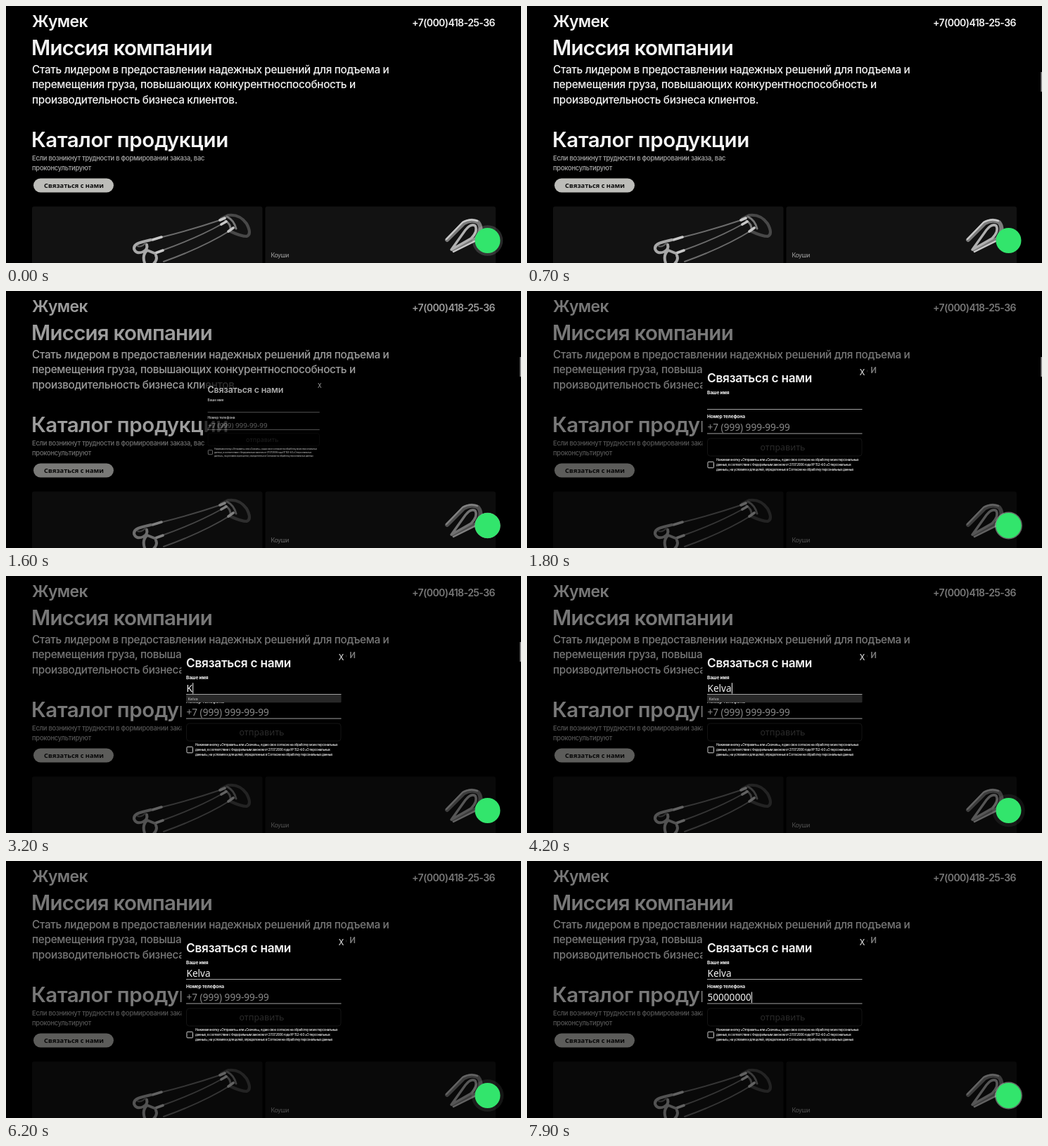
Animation, 732 px wide and 366 px high, one loop 8000 ms. Source, as an HTML page:

```html
<!DOCTYPE html>
<html lang="ru">
<head>
<meta charset="utf-8">
<title>Каталог</title>
<style>
  html, body { margin: 0; width: 100%; height: 100%; overflow: hidden; background: #000; }
  svg { display: block; width: 732px; height: 366px; }
  text { white-space: pre; font-family: Inter, sans-serif; fill: #f4f4f4; }
  .h { font-size: 29.5px; font-weight: 600; }
  .body { font-size: 15.3px; font-weight: 500; letter-spacing: -.31px; }
  .note { font-size: 9.4px; font-weight: 500; letter-spacing: -.25px; fill: #acacac; }
  .label { font-size: 6.6px; font-weight: 700; letter-spacing: -.16px; }
  .legal { font-size: 4.6px; font-weight: 500; letter-spacing: -.34px; }
  .ui { font-family: "Noto Sans", sans-serif; }
  .field { font-size: 13.6px; }
  .line { fill: none; stroke-linecap: round; stroke-linejoin: round; }
</style>
</head>
<body>
<svg viewBox="0 0 732 366">
  <rect width="732" height="366"/>

  <g id="page">
    <text x="37" y="30" font-size="23" font-weight="600" letter-spacing="-.7">Жумек</text>
    <text x="577" y="29" font-size="14" font-weight="600" letter-spacing="-.55">+7(000)418-25-36</text>
    <text class="h" x="36" y="70" letter-spacing="-.77">Миссия компании</text>
    <text class="body" x="37" y="95.5">Стать лидером в предоставлении надежных решений для подъема и</text>
    <text class="body" x="37" y="117">перемещения груза, повышающих конкурентноспособность и</text>
    <text class="body" x="37" y="138.5">производительность бизнеса клиентов.</text>
    <text class="h" x="36" y="200.5" letter-spacing="-.4">Каталог продукции</text>
    <text class="note" x="37" y="220">Если возникнут трудности в формировании заказа, вас</text>
    <text class="note" x="37" y="233.5">проконсультируют</text>
    <rect x="39" y="245.5" width="114" height="20" rx="10" fill="#bdbdb9"/>
    <text class="ui" x="54" y="258.8" font-size="9.25" font-weight="600" style="fill:#0a0a0a">Связаться с нами</text>

    <rect x="37" y="285.5" width="327.5" height="90" rx="3" fill="#121212"/>
    <rect x="368.5" y="285.5" width="327.5" height="90" rx="3" fill="#121212"/>

    <!-- rope sling -->
    <g class="line">
      <path d="M222 329Q266 318 304 305M222 348Q270 331 306 311M224 364Q280 344 320 319" stroke="#6c6c6c" stroke-width="1.9"/>
      <path d="M306 303L316 298Q332 296 342 310Q350 325 342 328Q334 328 319 321" stroke="#484848" stroke-width="4.2"/>
      <path d="M314 300Q324 305 327 317M312 306Q320 310 319 320" stroke="#787878" stroke-width="3"/>
      <path d="M304 305L311 302M306 311L313 307M316 321L323 316M208 333L221 329M212 352L223 348" stroke="#c8c8c8" stroke-width="3.6"/>
      <path d="M206 333L194 336Q181 339 182 346Q185 354 195 350Q202 346 200 340" stroke="#a8a8a8" stroke-width="4"/>
      <path d="M211 352L201 348Q193 354 197 366M213 355Q216 361 210 367" stroke="#a8a8a8" stroke-width="4"/>
      <path d="M187 342Q193 344 199 337" stroke="#636363" stroke-width="2"/>
    </g>

    <!-- thimble -->
    <g class="line">
      <path d="M627 333L651 309Q662 303 671 308Q679 318 668 332L636 347" stroke="#7c7c7c" stroke-width="6"/>
      <path d="M626 332L649 308Q660 302 670 306M636 350L666 335" stroke="#cacaca" stroke-width="2.5"/>
      <path d="M633 347L653 319Q661 309 667 313Q671 321 661 331L633 347" stroke="#b0b0b0" stroke-width="3.5"/>
    </g>
    <text x="376.5" y="357.5" font-size="8.6" letter-spacing="-.4" style="fill:#a8a8a8">Коуши</text>
  </g>

  <rect id="shade" width="732" height="366"/>
  <rect id="scroll" x="730.4" y="94" width="1.6" height="28" fill="#909090"/>

  <g id="modal">
    <rect x="249.5" y="98" width="234" height="172"/>
    <text x="256" y="129.8" font-size="17.3" font-weight="600" letter-spacing="-.27">Связаться с нами</text>
    <text class="ui" x="473" y="120" font-size="12" font-weight="300">X</text>
    <text class="label" x="256" y="147">Ваше имя</text>
    <text class="label" x="256" y="181.2">Номер телефона</text>
    <path d="M256 168.5H476.5M256 203H476.5" stroke="#b4b4b4" stroke-width=".9"/>
    <text id="name" class="ui field" x="256.5" y="164.7"></text>
    <text id="phone" class="ui field" x="256.5" y="199"></text>
    <g id="hint">
      <rect x="256" y="169" width="220.5" height="11.3" rx="1" fill="#282828"/>
      <text class="ui" x="258.5" y="176.6" font-size="5.7" style="fill:#c4c4c4">Kelva</text>
    </g>
    <rect id="caret" width="1" height="15.5" fill="#f4f4f4"/>
    <rect x="256.5" y="210" width="219.5" height="25" rx="4" fill="none" stroke="#141414"/>
    <text class="ui" x="331.5" y="227" font-size="12.4" font-weight="500" style="fill:#2b2b2b">отправить</text>
    <rect x="257" y="243.3" width="8.5" height="8.5" rx="1" fill="none" stroke="#d0d0d0"/>
    <text class="legal" x="269" y="242.3">Нажимая кнопку «Отправить» или «Скачать», я даю свое согласие на обработку моих персональных</text>
    <text class="legal" x="269" y="249.1">данных, в соответствии с Федеральным законом от 27.07.2006 года № 152-ФЗ «О персональных</text>
    <text class="legal" x="269" y="255.8">данных», на условиях и для целей, определенных в Согласии на обработку персональных данных</text>
  </g>

  <circle id="pulse" cx="684.5" cy="334" fill="#e8eee9"/>
  <circle cx="684.5" cy="334" r="18" fill="#32e56c"/>
</svg>

<script>
  const LOOP = 8000, STEP = 100;
  const NAME = 'Kelva', PHONE = '50000000', MASK = '+7 (999) 999-99-99';
  const nameKeys = [3000, 3500, 3700, 3900, 4100];
  const phoneKeys = [6500, 6800, 7000, 7100, 7300, 7400, 7600, 7800];

  const el = {};
  for (const node of document.querySelectorAll('[id]')) el[node.id] = node;

  const clamp = v => Math.min(1, Math.max(0, v));
  const within = (t, from, to) => t >= from && t < to;
  const show = (node, on) => node.setAttribute('visibility', on ? 'inherit' : 'hidden');
  const typed = (text, keys, t) => text.slice(0, keys.filter(k => t >= k).length);

  function set(node, attrs) {
    for (const key in attrs) node.setAttribute(key, attrs[key]);
  }

  function drawModal(t) {
    const e = Math.sin(clamp((t - 1400) / 400) * Math.PI / 2);
    const scale = .05 + .95 * e;
    el.shade.setAttribute('opacity', .51 * e);
    set(el.modal, {
      opacity: e,
      transform: `translate(366 183.5) scale(${scale}) translate(-366 -183.5)`
    });
    show(el.modal, e > 0);
  }

  function drawFields(t) {
    const phone = typed(PHONE, phoneKeys, t);
    el.name.textContent = typed(NAME, nameKeys, t);
    el.phone.textContent = phone || MASK;
    el.phone.style.fill = phone ? '' : '#8a8a8a';

    const inName = within(t, 2500, 4600), inPhone = t >= 6500;
    show(el.hint, within(t, 3000, 4600));
    show(el.caret, inName || inPhone);
    const field = inPhone ? el.phone : el.name;
    const width = field.textContent ? field.getComputedTextLength() : 0;
    set(el.caret, { x: 256.8 + width, y: inPhone ? 186.5 : 152.2 });
  }

  function drawPulse(t) {
    const p = clamp(((t + 530) % 2030) / 1000);
    const e = p * p * (3 - 2 * p);
    set(el.pulse, { r: 18 + 7 * e, opacity: .6 * (1 - e) ** 1.6 });
  }

  function draw(t) {
    drawModal(t);
    drawFields(t);
    drawPulse(t);
    show(el.scroll, within(t, 400, 3700) || within(t, 4500, 5800));
  }

  const start = performance.now();
  function tick() {
    const t = (performance.now() - start) % LOOP;
    draw(Math.floor(t / STEP) * STEP);
    requestAnimationFrame(tick);
  }
  tick();
</script>
</body>
</html>
```
